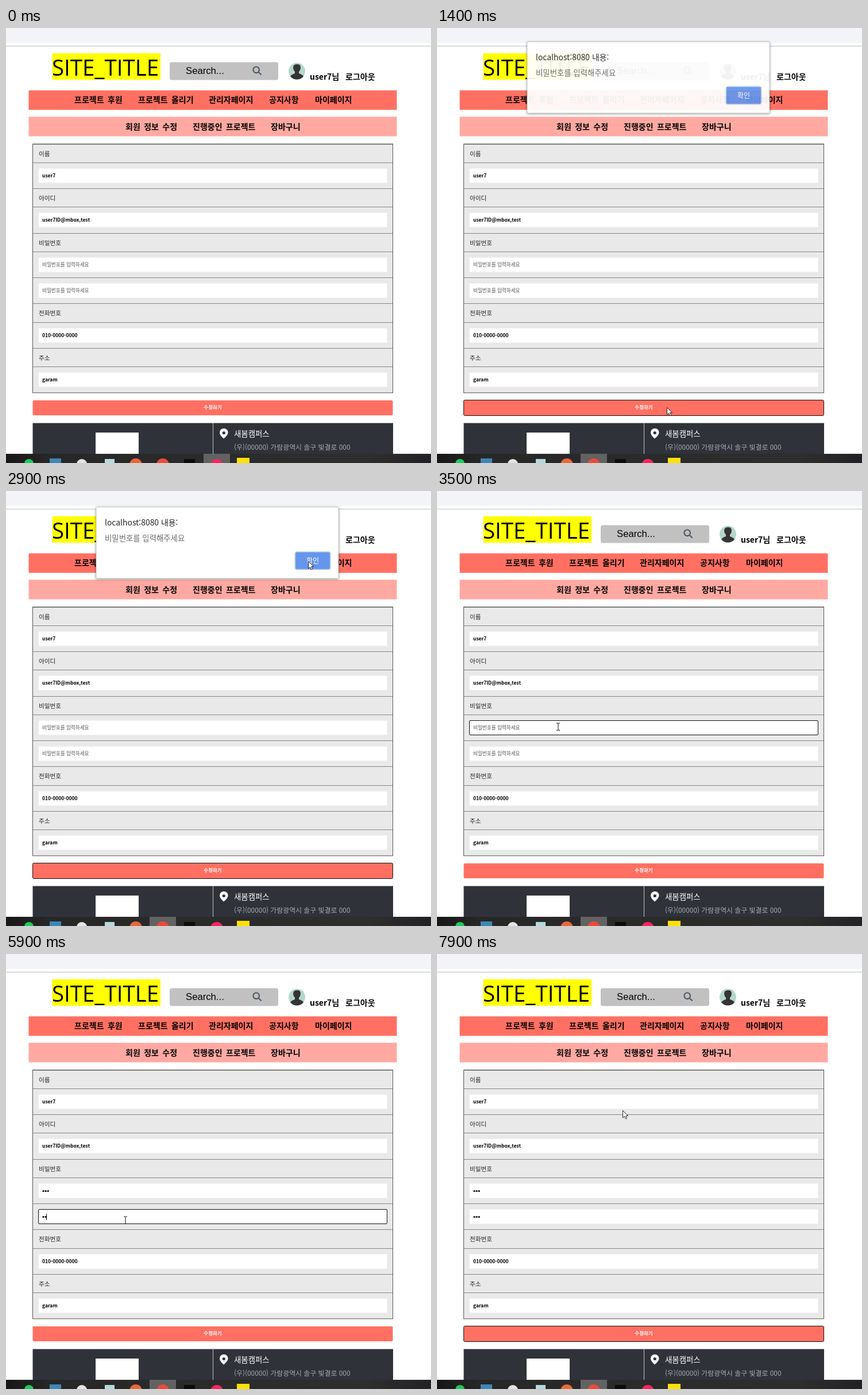
These frames come from a looping animation (740 by 757 pixels, 8 s). An HTML page:

```html
<!DOCTYPE html>
<html lang="ko">
<head>
<meta charset="utf-8">
<title>회원 정보 수정</title>
<style>
html, body { margin: 0; width: 100%; height: 100%; overflow: hidden; background: #fff; }
svg { display: block; width: 740px; height: 757px; font-family: "Noto Sans CJK KR", "Noto Sans CJK", "Noto Sans", sans-serif; }
.menu { font-size: 14px; font-weight: 700; word-spacing: 2.5px; }
.label { font-size: 10.6px; fill: #222; }
.value { font-size: 8.5px; font-weight: 700; }
.hint { font-size: 8.6px; font-weight: 500; fill: #555; }
</style>
</head>
<body>
<svg id="stage" viewBox="0 0 740 757">
  <defs>
    <linearGradient id="bar">
      <stop stop-color="#171717"/><stop offset=".1" stop-color="#272727"/>
      <stop offset=".85" stop-color="#2e2e2e"/><stop offset="1" stop-color="#222226"/>
    </linearGradient>
    <filter id="shadow" x="-5%" y="-10%" width="110%" height="125%">
      <feDropShadow dx="0" dy="1" stdDeviation="2.2" flood-opacity=".5"/>
    </filter>
  </defs>
  <rect width="740" height="757" fill="#fff"/>
  <rect width="740" height="26" fill="#f3f4f7"/>
  <rect y="31" width="740" height="1" fill="#bdbdbd"/>

  <rect x="80.5" y="44" width="188.5" height="46" fill="#ff0"/>
  <text x="80" y="83" font-size="38.4" font-family="'Open Sans', sans-serif">SITE_TITLE</text>
  <rect x="285" y="59.5" width="189" height="31" rx="3.5" fill="#c1c1c1"/>
  <text x="313" y="80" font-size="16.7" font-family="'Liberation Sans', sans-serif">Search...</text>
  <path d="M439.5 76.5l5 5M441 72.8a5.3 5.3 0 1 1-10.6 0a5.3 5.3 0 1 1 10.6 0" fill="none" stroke="#4b5a65" stroke-width="2.2"/>
  <circle cx="506.5" cy="75" r="14.5" fill="#b6d6cc"/>
  <path d="M495 84q2-3 8-5v-3q-3-3-3-7 0-6 6.5-6t6.5 6q0 4-3 7v3q6 2 8 5-4 5.5-11.5 5.5T495 84" fill="#343434"/>

  <rect x="39.5" y="108.5" width="641" height="34" fill="#ff7062"/>
  <rect x="39.5" y="154.5" width="641" height="34" fill="#ffa9a2"/>
  <g id="menus"></g>
  <g id="table"></g>

  <rect id="button" rx="2" fill="#ff7062"/>
  <text id="buttonText" x="360" y="663" class="value" text-anchor="middle" fill="#fff">수정하기</text>

  <g id="footer">
    <rect x="46.5" y="687.5" width="627.5" height="70" fill="#2f3238"/>
    <rect x="360" y="687.5" width="1" height="70" fill="#c8c8c8"/>
    <rect x="156" y="704" width="75" height="75" fill="#fff"/>
    <path d="M379 714.5q-7-6-7-10.5a7.3 7.3 0 0 1 14.6 0q0 4.5-7.6 10.5" fill="#fff"/>
    <circle cx="379.3" cy="704.5" r="2.6" fill="#2f3238"/>
    <text x="397" y="711" font-size="13.4" font-weight="500" fill="#fff">새봄캠퍼스</text>
    <text x="397" y="733.5" font-size="11.9" fill="#a9abae">(우)(00000) 가람광역시 솔구 빛결로 000</text>
  </g>

  <rect y="741" width="740" height="16" fill="url(#bar)"/>
  <rect id="activeTask" y="741" width="46" height="16" fill="#626262"/>
  <g id="tasks"></g>

  <g id="dialog">
    <rect x="157" y="28" width="422" height="124" rx="1.5" fill="#fff" stroke="#aaa" stroke-width=".6" filter="url(#shadow)"/>
    <text x="172" y="60" font-size="13.9" fill="#222">localhost:8080 내용:</text>
    <text id="message" x="172" y="87" font-size="13.4" fill="#6b6b6b"></text>
    <rect x="503.5" y="106" width="61" height="30.5" rx="3" fill="#6596eb" stroke="#a9c6f5" stroke-width="1.5"/>
    <text x="534" y="125.5" font-size="12" text-anchor="middle" fill="#fff">확인</text>
  </g>

  <path id="arrow" d="M.5.5v12.5l3-2.6 2 4.4 2.2-1-2-4.3h4z" fill="#fff" stroke="#111" stroke-width=".9"/>
  <path id="beam" d="M-3-6h2.3l.7.7.7-.7H3M0-5.5v11.5M-3 6.5h2.3l.7-.7.7.7H3" fill="none" stroke="#111"/>
</svg>
<script>
const $ = id => document.getElementById(id);
const set = (id, attrs) => Object.entries(attrs).forEach(([k, v]) => $(id).setAttribute(k, v));
const text = (x, y, cls, s, id = '') => `<text x="${x}" y="${y}" class="${cls}" id="${id}">${s}</text>`;
const show = (id, on) => set(id, { visibility: on ? 'visible' : 'hidden' });
const within = (t, ...spans) => spans.some(([a, b]) => t >= a && t < b);
const clamp = v => Math.max(0, Math.min(1, v));

$('menus').innerHTML = [
  [529, 90, 'user7님'], [591, 90, '로그아웃'],
  [119, 130, '프로젝트 후원'], [230, 130, '프로젝트 올리기'], [353, 130, '관리자페이지'],
  [458, 130, '공지사항'], [538, 130, '마이페이지'],
  [208, 176.5, '회원 정보 수정'], [325, 176.5, '진행중인 프로젝트'], [461, 176.5, '장바구니']
].map(([x, y, s]) => text(x, y, 'menu', s)).join('');

// A value of null is a password field.
const rows = [
  ['label', '이름'], ['value', 'user7'], ['label', '아이디'], ['value', 'user7ID@mbox,test'],
  ['label', '비밀번호'], ['value', null], ['value', null],
  ['label', '전화번호'], ['value', '010-0000-0000'], ['label', '주소'], ['value', 'garam']
];
const inputs = [];
let y = 202, passwordCount = 0;
let html = '<rect x="46" y="202" width="628" height="433" fill="#e9e9e9"/>';
for (const [kind, content] of rows) {
  const top = Math.floor(y);
  html += `<rect x="46" y="${top}" width="628" height="1" fill="#858585"/>`;
  if (kind === 'label') {
    html += text(57, top + 20.5, 'label', content);
    y += 32.4;
    continue;
  }
  y += 45.15;
  inputs.push(top + 10);
  const box = `x="56.5" y="${top + 10.5}" width="607" height="25"`;
  html += `<rect ${box} fill="#fff" stroke="#f1f1f1"/>`;
  if (content) {
    html += text(63, top + 25.5, 'value', content);
    continue;
  }
  const n = passwordCount++;
  html += `<rect id="ring${n}" ${box} rx="1.5" fill="none" stroke="#111"/>`
    + text(63, top + 25.5, 'hint', '비밀번호를 입력하세요', 'hint' + n)
    + [0, 1, 2].map(i => `<circle id="dot${n}${i}" cx="${65 + i * 4.1}" cy="${top + 23.5}" r="1.6"/>`).join('')
    + `<rect id="caret${n}" y="${top + 18}" width="1" height="11"/>`;
}
$('table').innerHTML = html + '<rect x="46.5" y="201.8" width="627" height="433" fill="none" stroke="#555"/>';

const disc = (x, y, r, c) => `<circle cx="${x}" cy="${y}" r="${r}" fill="${c}"/>`;
const block = (x, y, w, c) => `<rect x="${x}" y="${y}" width="${w}" height="${w}" fill="${c}"/>`;
$('tasks').innerHTML = disc(40, 758, 8, '#1ecb5c') + block(76, 749, 20, '#3d86b5')
  + disc(132, 759, 9, '#e4e4e4') + block(172, 750, 17, '#b5d7df') + disc(226, 760, 11, '#e8683c')
  + disc(273, 760, 11, '#e94b3b') + block(310, 750, 19, '#0c0c0c') + disc(367, 761, 11, '#f5265f')
  + block(402, 748, 22, '#ffe100');

// Pointer stops: time, x, y
const path = [
  [100, 486, 167], [300, 426, 410], [500, 395, 535], [700, 400, 660],
  [1500, 400, 660], [1700, 406, 632], [1800, 468, 335], [1900, 505, 193], [2100, 524, 115],
  [2200, 526, 122], [3000, 526, 122], [3300, 232, 403], [3400, 211, 410],
  [4900, 211, 410], [5100, 212, 489], [5300, 211, 489], [5500, 208, 463],
  [6000, 208, 463], [6100, 226, 533], [6200, 240, 640], [6500, 248, 660],
  [6900, 248, 660], [7300, 530, 118], [7400, 530, 118], [7900, 323, 272], [8000, 323, 272]
];
function pointerAt(t) {
  const i = Math.max(1, path.findIndex(p => p[0] > t));
  const [t0, x0, y0] = path[i - 1], [t1, x1, y1] = path[i];
  const p = clamp((t - t0) / (t1 - t0));
  return [x0 + (x1 - x0) * p, y0 + (y1 - y0) * p];
}

const alerts = [
  { open: 1280, close: 2900, message: '비밀번호를 입력해주세요' },
  { open: 6700, close: 7400, message: '값이 일치하지 않습니다.' }
];
const fields = [
  { focus: [3500, 5100], keys: [4000, 4200, 5000], caret: [[3700, 4700], [5000, 5100]] },
  { focus: [5500, 6200], keys: [5700, 5900, 6100], caret: [[5700, 6200]] }
];
const buttonStyles = {
  idle: { x: 46.5, y: 648, width: 627, height: 26, stroke: 'none' },
  focused: { x: 46.5, y: 647.5, width: 627, height: 27, stroke: '#111', 'stroke-width': 1 },
  pressed: { x: 47, y: 648, width: 626, height: 27, stroke: '#111', 'stroke-width': 2 }
};

function draw(t) {
  const pressed = within(t, [800, 1300], [6500, 6700]);
  const focused = within(t, [800, 3400], [6500, 8000]);
  set('button', buttonStyles[pressed ? 'pressed' : focused ? 'focused' : 'idle']);
  set('buttonText', { y: pressed ? 664 : 663 });
  set('footer', { transform: `translate(0 ${pressed ? 1.5 : 0})` });
  set('activeTask', { x: t < 1300 ? 344 : 250 });

  fields.forEach(({ focus, keys, caret }, n) => {
    const typed = keys.filter(k => t >= k).length;
    show('ring' + n, within(t, focus));
    show('hint' + n, !typed);
    for (let i = 0; i < 3; i++) show(`dot${n}${i}`, i < typed);
    show('caret' + n, within(t, ...caret));
    set('caret' + n, { x: Math.round(62 + typed * 4.1) });
  });

  const alert = alerts.find(a => within(t, [a.open, a.close + 200]));
  show('dialog', alert);
  if (alert) {
    const p = Math.min(clamp((t - alert.open) / 200), 1 - clamp((t - alert.close) / 200));
    const opacity = t < alert.close ? 1 - (1 - p) ** 3 : p ** 3;
    set('dialog', { transform: `translate(0 ${10 * (p - 1)})`, opacity });
    $('message').textContent = alert.message;
  }

  const [px, py] = pointerAt(t);
  const overInput = px > 56 && px < 664 && inputs.some(top => py >= top && py < top + 25);
  show('arrow', t >= 100 && !overInput);
  show('beam', t >= 100 && overInput);
  set(overInput ? 'beam' : 'arrow', { transform: `translate(${Math.round(px)} ${Math.round(py)})` });
}

// The screen updates in steps of 100 ms.
function frame() {
  draw(Math.floor(performance.now() % 8000 / 100) * 100);
  requestAnimationFrame(frame);
}
frame();
</script>
</body>
</html>
```
